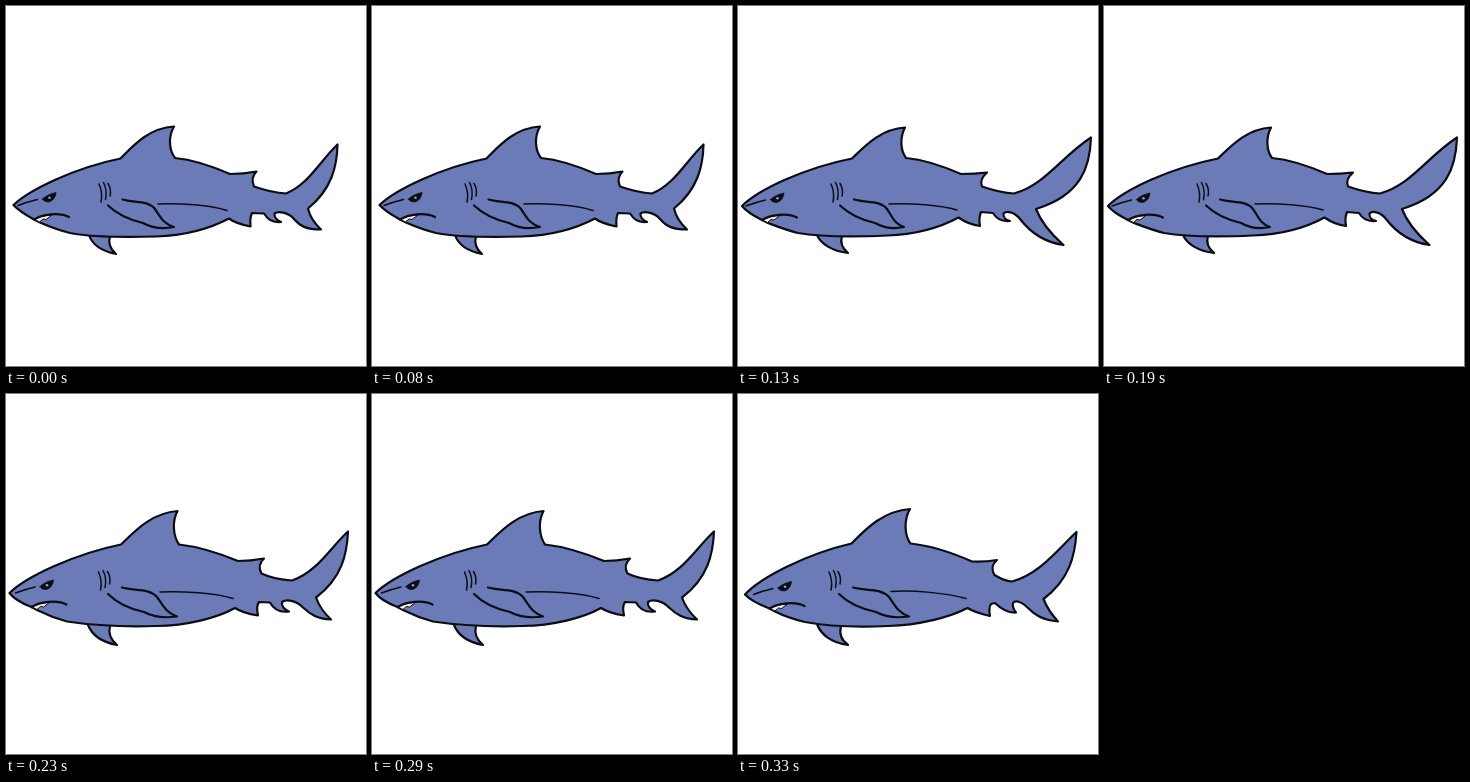
Animation, 360 px wide and 360 px high, one loop 0.43 s. Source, as an HTML page:

```html
<!DOCTYPE html>
<html lang="en">
<head>
<meta charset="utf-8">
<title>Swimming shark</title>
<style>
  html, body { margin: 0; width: 100%; height: 100%; overflow: hidden; background: #fff; }
  svg { display: block; width: 100%; height: 100%; }
  path { fill: none; stroke: #0c0d12; stroke-width: 2.2; stroke-linecap: round; stroke-linejoin: round; }
  .skin { fill: #6b7bb7; }
  .thin { stroke-width: 1.5; }
  .eye { fill: #0c0d12; stroke-width: .8; }
  .tooth { fill: #f4f1e4; stroke-width: 1; }
  .glint { fill: #8f9ac8; }
</style>
</head>
<body>
<svg viewBox="0 0 360 360">
  <path id="farFin" class="skin"/>
  <path id="body" class="skin"/>
  <path id="nearFin"/>
  <path id="flank" class="thin"/>
  <path id="gills" class="thin" d="M93 178Q97 187 95 196M97.500 176.500Q101.500 184 99.500 193.500M102 177.500Q105.500 183 104 190"/>
  <g id="face">
    <path class="thin" d="M12 199.500Q21 196 31.500 193.500"/>
    <path class="eye" d="M36.500 193Q41 188.500 50 186.500Q49 194 43.500 195.800Q38.500 196.500 36.500 193Z"/>
    <circle class="glint" cx="43.500" cy="191.800" r="1.300"/>
    <path class="tooth" d="M28.500 213.500L33.500 216L37 213L40 213.500L46 209Q36 209 28.500 213.500Z"/>
    <path d="M28 213.500C36 208 54 206 63 211"/>
  </g>
</svg>
<script>
const poses = [
  {
    hold: 130,
    face: [0, 0],
    gills: 0,
    body: `M7.500 199C23 184 68 162 114.500 152.500C126 141 142 122 168 120.500C162 131 163 144 169 152
      C190 154 208 161 224 168Q238 168 250.500 165.500C245 171 246 176 248 180.500C258 184 270 187 280 187.500
      C302 179 314 155 331.500 138.500C331 160 326 183 302 202.500C304 211 308 217 315 223.500
      C300 223.500 294 220 288 213C282 206 272 205 268.500 207.500C268 211 271 214 275 216
      C265 217 261 212 258 207.500L246 207C244 211 244 215 244.500 220.500C237 219 229 217 223 212.500
      C205 222 179 229.500 150 230.500C116 231.500 86 231 64 227C52 224 42 220 34 216.500L28 213.500C18 208 12 204 7.500 199Z`,
    farFin: "M83 229C86 238 95 245 110 248C104 243 102 237 104 230",
    nearFin: "M102 199.500C112 209 124 214 137 217C146 222 158 223 168 221C157 218 154 210 149 203C142 194 128 197 116.500 193.500",
    flank: "M152 198C174 197 204 199 221 204.500"
  },
  {
    hold: 100,
    face: [-4, .5],
    gills: 0,
    body: `M4 200C20 184 66 162 114 152.500C126 141 142 123 167 121.500C162 131 162 144 168 152
      C189 154 207 161 223 168Q237 168 249 166.500C244 171 242 176 244 180.500C254 184 265 187 276 187.500
      C307 179 323 151 353 131.500C352 160 344 189 298 203C303 216 313 228 325.500 239
      C305 236 292 226 282 213C276 205 268 205 265.500 207.500C265 211 268 214 272 215
      C262 216 258 212 255 207L243 206C241 211 241 215 242 220C234 219 227 216 220.500 211.500
      C203 221 178 228.500 149 229.500C115 231 83 231 60 227C48 224 38 220 30 217L24 214C14 209 8 205 4 200Z`,
    farFin: "M79 229C83 238 94 245 110 247C104 242 102 236 104 230",
    nearFin: "M102 199.500C112 209 124 214 137 217C146 222 157 223 166 221C156 218 154 210 149 203C142 194 128 197 116 193.500",
    flank: "M151 198C174 197 202 199 219 204"
  },
  {
    hold: 100,
    face: [-2.500, -.5],
    gills: -.5,
    body: `M3.500 199C20 183 68 160 115 150.500C128 138 145 119 171.500 117C166 127 167 142 173 150.500
      C196 153 215 160 232 167Q245 167 258 164.500C252 170 253 175 255.500 179.500C265 184 277 186 286 186.500
      C311 178 324 154 342 137.500C341 160 336 184 310 203.500C313 212 318 219 325 225.500
      C311 225 304 220 297 213.500C290 206 280 205 276 208C275 212 279 216 283 217.500
      C272 219 267 214 264 208.500L253 208C250 212 251 217 252 221.500C243 220 235 218 229 214
      C211 224 181 231.500 150 232C115 233 84 231 61 227.500C48 224 39 220 31 216L25.500 213C15 209 8 205 3.500 199Z`,
    farFin: "M82 231C86 241 95 248 111 251C104 245 102 239 104 232",
    nearFin: "M102 200C112 210 124 215 138 218C147 223 160 224 171 222.500C160 219 157 211 151 203C143 194 128 197 116 193.500",
    flank: "M154 198C177 197 209 199 227 204.500"
  },
  {
    hold: 100,
    face: [3.500, 1],
    gills: -2,
    body: `M7 200.500C22 184 68 160 113.500 149.500C126 137 144 117 172 115C166 125 166 141 172.500 149.500
      C197 152 217 160 234 167.500Q247 168 259 166C253 171 254 177 256.500 181C263 185 268 187 274 187.500
      C302 180 320 155 338.500 138C337 161 332 185 305.500 205C309 214 314 221 320 227.500
      C304 226 297 221 290 214C283 207 277 206 275 209C274 213 276 216 278 218.500
      C268 219 262 214 257 209L253 210C251 213 251 217 252 222C243 220 236 218 229.500 214
      C212 223 181 231.500 150 232C116 233.500 88 232 67 228C54 225 44 221 37 217.500L31.500 214.500C20 210 12 206 7 200.500Z`,
    farFin: "M79 230C83 241 94 249 110 251C103 246 101 240 103 232",
    nearFin: "M101 200C111 210 124 215 138 218C147 223 160 224 171 222.500C160 219 157 211 151 203C143 194 128 197 115 193.500",
    flank: "M153 197.500C176 196 209 199 228 204.500"
  }
];

const loop = poses.reduce((sum, pose) => sum + pose.hold, 0);
const part = id => document.getElementById(id);
let shown;

function poseAt(time) {
  let left = time % loop;
  return poses.find(pose => (left -= pose.hold) < 0);
}

function show(pose) {
  for (const id of ["body", "farFin", "nearFin", "flank"]) part(id).setAttribute("d", pose[id]);
  part("face").setAttribute("transform", `translate(${pose.face})`);
  part("gills").setAttribute("transform", `translate(${pose.gills})`);
  shown = pose;
}

const start = performance.now();
function tick() {
  const pose = poseAt(performance.now() - start);
  if (pose !== shown) show(pose);
  requestAnimationFrame(tick);
}
tick();
</script>
</body>
</html>
```
